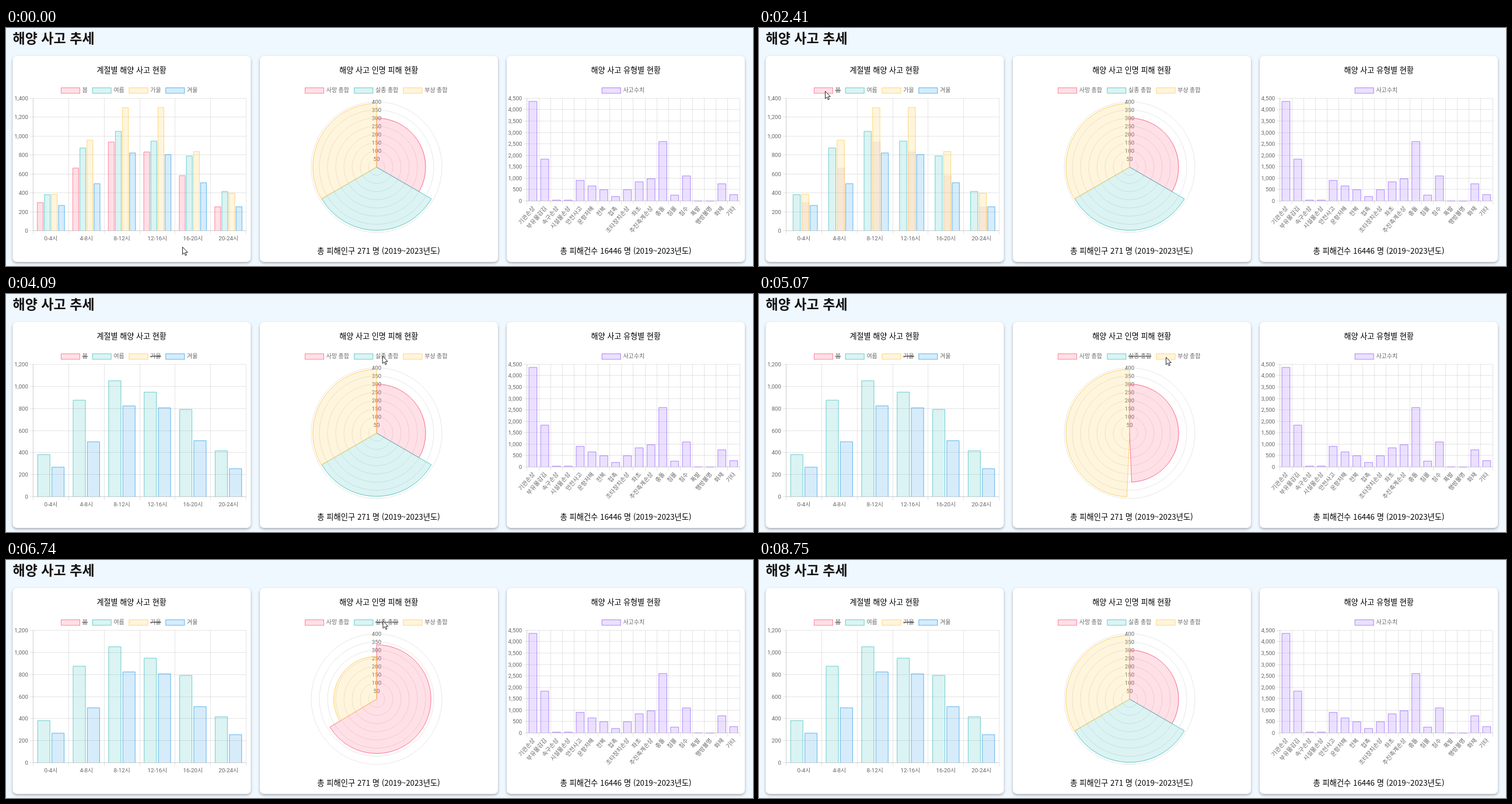
Recreate the animation shown at these times as an HTML page with a canvas. Size 1280x408 px, loop 9960 ms.

```html
<!DOCTYPE html>
<html lang="ko">
<head>
<meta charset="utf-8">
<title>해양 사고 추세</title>
<style>
  html, body { margin: 0; width: 100%; height: 100%; overflow: hidden; background: #f0f8ff; }
  svg, canvas { position: absolute; left: 0; top: 0; width: 1280px; height: 408px; }
  svg { font: 13.3px "Noto Sans CJK KR", "Noto Sans CJK", sans-serif; fill: #000; }
  .card { fill: #fff; filter: drop-shadow(0 2px 2px rgba(0, 0, 0, .32)); }
  .mid { text-anchor: middle; }
  .name { font-size: 13.1px; }
  .head { font-size: 23.05px; font-weight: 700; fill: #111; }
</style>
</head>
<body>
<svg viewBox="0 0 1280 408">
  <rect class="card" x="11.5" y="48" width="408" height="353" rx="7"/>
  <rect class="card" x="435" y="48" width="408" height="353" rx="7"/>
  <rect class="card" x="858" y="48" width="408" height="353" rx="7"/>
  <text class="head" x="11.5" y="26.3">해양 사고 추세</text>
  <g class="mid">
    <text class="name" x="215.2" y="76.6">계절별 해양 사고 현황</text>
    <text class="name" x="638.7" y="76.6">해양 사고 인명 피해 현황</text>
    <text class="name" x="1062.2" y="76.6">해양 사고 유형별 현황</text>
    <text x="638.5" y="386.8">총 피해인구 271 명 (2019~2023년도)</text>
    <text x="1062" y="386.8">총 피해건수 16446 명 (2019~2023년도)</text>
  </g>
</svg>
<canvas id="stage" width="1280" height="408"></canvas>
<script>
const ctx = document.getElementById('stage').getContext('2d');
const LOOP = 9960;
const PINK = [255, 99, 132], TEAL = [75, 192, 192], YELLOW = [255, 205, 86],
      BLUE = [54, 162, 235], PURPLE = [153, 102, 255];

const seasons = [
  { name: '봄', x: 94, color: PINK, hover: [255, 48, 89], data: [300, 665, 940, 835, 585, 255] },
  { name: '여름', x: 147.7, color: TEAL, hover: [2, 212, 212], data: [384, 877, 1053, 950, 793, 418] },
  { name: '가을', x: 210.5, color: YELLOW, hover: [255, 188, 35], data: [387, 960, 1303, 1305, 840, 400] },
  { name: '겨울', x: 273.3, color: BLUE, data: [270, 500, 825, 808, 510, 256] }
];
const hours = ['0-4시', '4-8시', '8-12시', '12-16시', '16-20시', '20-24시'];
const victims = [
  { name: '사망 총합', x: 512, color: PINK, value: 300 },
  { name: '실종 총합', x: 596.3, color: TEAL, value: 387 },
  { name: '부상 총합', x: 680.5, color: YELLOW, value: 390 }
];
const kinds = ['기관손상', '부유물감김', '속구손상', '시설물손상', '안전사고', '운항저해', '전복', '접촉',
  '조타장치손상', '좌초', '추진축계손상', '충돌', '침몰', '침수', '폭발', '행방불명', '화재', '기타'];
const counts = [4370, 1840, 45, 45, 910, 665, 500, 205, 500, 845, 980, 2610, 265, 1105, 8, 4, 760, 285];

// Each stage starts with a legend click; a hidden bar drifts to the last slot.
const barStages = [
  { at: -2000, slots: [0, 1, 2, 3], n: 4, max: 1400, shown: [1, 1, 1, 1] },
  { at: 2195, slots: [2, 0, 1, 2], n: 3, max: 1400, shown: [0, 1, 1, 1] },
  { at: 3115, slots: [1, 0, 1, 1], n: 2, max: 1200, shown: [0, 1, 0, 1] }
];
const pieStages = [
  { at: -2000, max: 400, shown: [1, 1, 1] },
  { at: 4517, max: 400, shown: [1, 0, 1] },
  { at: 5350, max: 300, shown: [1, 0, 0] },
  { at: 6497, max: 400, shown: [1, 0, 1] },
  { at: 7230, max: 400, shown: [1, 1, 1] }
];
// time, x, y
const pointer = [
  [0, 302, 375], [420, 228, 285], [640, 184, 236], [780, 183.5, 232], [1050, 183.5, 230],
  [1180, 192, 205], [1450, 150, 130], [1700, 116, 84], [1930, 113, 108], [2480, 113, 108],
  [2950, 225, 105], [3460, 225, 105], [4100, 645, 106], [4600, 641, 107], [5070, 697, 108],
  [5210, 702, 108], [6510, 700, 108], [6740, 645.5, 104], [7300, 645, 104], [8000, 1152, 118],
  [8210, 1090, 110], [8470, 1090, 110], [8540, 1080, 102], [8610, 1122, 118], [8680, 1222, 152]
];
// time, hovered season
const hovers = [[490, 2], [590, 0], [1120, 1]];
const HOVER_END = 1250;

const clamp = v => Math.min(1, Math.max(0, v));
const mix = (a, b, k) => a + (b - a) * k;
const easeOut = p => 1 - (1 - clamp(p)) ** 4;
const rgba = (c, a) => `rgba(${c.map(Math.round)},${a})`;
const last = (list, ok) => list.reduce((found, item, i) => ok(item) ? i : found, -1);

function stageAt(stages, t) {
  const i = last(stages, s => s.at <= t);
  return { to: stages[i], from: stages[Math.max(0, i - 1)], k: easeOut((t - stages[i].at) / 1000) };
}

function line(x1, y1, x2, y2, color = 'rgba(0,0,0,.1)', width = 1) {
  ctx.strokeStyle = color;
  ctx.lineWidth = width;
  ctx.beginPath();
  ctx.moveTo(x1, y1);
  ctx.lineTo(x2, y2);
  ctx.stroke();
}

function label(str, x, y, align = 'left', size = 10, color = '#666', weight = 400) {
  ctx.font = `${weight} ${size}px Roboto, "Noto Sans CJK KR", "Noto Sans CJK", sans-serif`;
  ctx.textAlign = align;
  ctx.fillStyle = color;
  ctx.fillText(str, x, y + 3.6);
  return ctx.measureText(str).width;
}

function legend(items, shown) {
  items.forEach((it, i) => {
    ctx.fillStyle = rgba(it.color, .2);
    ctx.fillRect(it.x, 102, 33, 10);
    ctx.strokeStyle = rgba(it.color, .75);
    ctx.lineWidth = 1;
    ctx.strokeRect(it.x + .5, 102.5, 32, 9.5);
    const w = label(it.name, it.x + 36.7, 106.3);
    if (!shown[i]) line(it.x + 36.7, 106.8, it.x + 36.7 + w, 106.8, '#666', 1.6);
  });
}

function axes(box, max, step, columns) {
  const { left, right, top, bottom } = box;
  for (let v = 0; v <= max; v += step) {
    const y = Math.round(mix(bottom, top, v / max) - .5) + .5;
    line(left - 6, y, right, y);
    label(v.toLocaleString('en-US'), left - 8.5, y - .2, 'right', 9.7);
  }
  for (let i = 0; i <= columns; i++) {
    const x = Math.round(mix(left, right, i / columns) - .5) + .5;
    line(x, top, x, bottom + 6.5);
  }
  line(left, top, left, bottom);
  line(left, bottom, right, bottom);
}

function bar(x, y, w, bottom, color, fade = 1) {
  const c = color.map(v => v * fade ** (1 / 2.2));
  ctx.fillStyle = rgba(c, .2 * fade);
  ctx.fillRect(x, y, w, bottom - y);
  // A vanishing bar loses its outline well before its fill.
  ctx.strokeStyle = rgba(c, .8 * fade ** 3);
  ctx.lineWidth = .9;
  ctx.beginPath();
  ctx.moveTo(x + .45, bottom);
  ctx.lineTo(x + .45, y + .45);
  ctx.lineTo(x + w - .45, y + .45);
  ctx.lineTo(x + w - .45, bottom);
  ctx.stroke();
}

function seasonChart(t) {
  const box = { left: 46.5, right: 411.5, top: 120.5, bottom: 347.5 };
  const { from, to, k } = stageAt(barStages, t);
  const cell = (box.right - box.left) / 6;
  const hover = t < HOVER_END ? last(hovers, h => h[0] <= t) : -1;
  legend(seasons, to.shown);
  axes(box, to.max, 200, 6);
  hours.forEach((h, i) => label(h, box.left + cell * (i + .5), 360.7, 'center', 9.8));

  const place = (s, set, cat) => {
    const slot = cell * .8 / s.n;
    return [box.left + cell * (cat + .1) + slot * (s.slots[set] + .05), slot * .9,
      mix(box.bottom, box.top, seasons[set].data[cat] / s.max)];
  };
  ctx.save();
  ctx.beginPath();
  ctx.rect(box.left, box.top - .5, box.right - box.left, box.bottom - box.top + 1);
  ctx.clip();
  for (let set = 3; set >= 0; set--) {
    const fade = mix(from.shown[set], to.shown[set], k);
    if (fade < .004) continue;
    hours.forEach((_, cat) => {
      const a = place(from, set, cat), b = place(to, set, cat);
      const [x, w, y] = a.map((v, i) => mix(v, b[i], k));
      const lit = cat === 2 && hover >= 0 && hovers[hover][1] === set;
      bar(x, y, w, box.bottom, lit ? seasons[set].hover : seasons[set].color, fade);
    });
  }
  ctx.restore();
}

function tooltip(t) {
  const i = last(hovers, h => h[0] <= t);
  const alpha = clamp((t - hovers[0][0]) / 200) * clamp(1 - (t - HOVER_END) / 200);
  if (i < 0 || alpha <= 0) return;
  const spot = n => {
    const set = hovers[n][1], value = seasons[set].data[2];
    return [186 + set * 12.2, 347.5 - value * 227 / 1400, set ? 72 : 52];
  };
  const a = spot(Math.max(0, i - 1)), b = spot(i), k = easeOut((t - hovers[i][0]) / 400);
  const [x, y, w] = a.map((v, j) => mix(v, b[j], k));
  const s = seasons[hovers[i][1]];
  ctx.save();
  ctx.globalAlpha = alpha;
  ctx.fillStyle = 'rgba(0,0,0,.74)';
  ctx.beginPath();
  ctx.roundRect(x, y - 18, w, 36, 5);
  ctx.moveTo(x, y - 4.5);
  ctx.lineTo(x - 4.5, y);
  ctx.lineTo(x, y + 4.5);
  ctx.fill();
  label('8-12시', x + 5, y - 8.7, 'left', 9.8, '#fff', 700);
  ctx.fillStyle = '#fff';
  ctx.fillRect(x + 5, y + 3, 10, 10);
  ctx.fillStyle = rgba(s.hover, .25);
  ctx.fillRect(x + 6, y + 4, 8, 8);
  label(`${s.name}: ${s.data[2].toLocaleString('en-US')}`, x + 16.5, y + 7.8, 'left', 9.8, '#fff', 700);
  ctx.restore();
}

function victimChart(t) {
  const cx = 635, cy = 238.5, R = 112;
  const { from, to, k } = stageAt(pieStages, t);
  legend(victims, to.shown);
  const rings = to.max / 50;
  ctx.strokeStyle = 'rgba(0,0,0,.1)';
  ctx.lineWidth = 1;
  for (let i = 1; i <= rings; i++) {
    ctx.beginPath();
    ctx.arc(cx, cy, R * i / rings, 0, 7);
    ctx.stroke();
  }
  for (let i = 1; i <= rings; i++) {
    const y = cy - R * i / rings;
    ctx.fillStyle = 'rgba(255,255,255,.75)';
    ctx.fillRect(cx - 10, y - 6.5, 20, 13);
    label(i * 50, cx, y, 'center', 9.7);
  }
  const arcs = s => {
    const sweep = 2 * Math.PI / s.shown.reduce((a, b) => a + b);
    let angle = -Math.PI / 2;
    return victims.map((v, i) => {
      const start = angle;
      angle += s.shown[i] * sweep;
      return [s.shown[i] * R * v.value / s.max, start, angle];
    });
  };
  const before = arcs(from), after = arcs(to);
  victims.forEach((v, i) => {
    const [r, start, end] = before[i].map((n, j) => mix(n, after[i][j], k));
    if (r < .3) return;
    ctx.beginPath();
    if (end - start < 2 * Math.PI - .001) ctx.moveTo(cx, cy);
    ctx.arc(cx, cy, r, start, end);
    ctx.closePath();
    ctx.fillStyle = rgba(v.color, .2);
    ctx.fill();
    ctx.strokeStyle = rgba(v.color, .9);
    ctx.lineWidth = 1;
    ctx.stroke();
  });
}

function kindChart() {
  const box = { left: 892.8, right: 1257, top: 120.3, bottom: 296.4 };
  const cell = (box.right - box.left) / kinds.length;
  legend([{ name: '사고수치', x: 1020.7, color: PURPLE }], [1]);
  axes(box, 4500, 500, kinds.length);
  kinds.forEach((name, i) => {
    const x = box.left + cell * i;
    bar(x + cell * .14, mix(box.bottom, box.top, counts[i] / 4500), cell * .72, box.bottom, PURPLE);
    ctx.save();
    ctx.translate(x + cell / 2 + 1, 307);
    ctx.rotate(-50 * Math.PI / 180);
    label(name, 0, 0, 'right', 10.1);
    ctx.restore();
  });
}

function cursor(t) {
  if (t >= 8750) return;
  const i = last(pointer, p => p[0] <= t);
  const a = pointer[i], b = pointer[i + 1] || a;
  const p = b === a ? 0 : (t - a[0]) / (b[0] - a[0]);
  const k = p * p * (3 - 2 * p);
  ctx.save();
  ctx.translate(mix(a[1], b[1], k), mix(a[2], b[2], k));
  ctx.fillStyle = '#fff';
  ctx.strokeStyle = '#222';
  ctx.lineWidth = 1;
  ctx.lineJoin = 'round';
  ctx.fill(cursorShape);
  ctx.stroke(cursorShape);
  ctx.restore();
}
const cursorShape = new Path2D('M.5 .5V13.2L3.4 10.4 5.4 15 7.4 14.1 5.4 9.7H9.4Z');

// The picture advances in 70 ms ticks, restarting at these moments.
const ticks = [0, 780, 1100, 2130, 6740, 8540];
function snap(t) {
  const base = ticks[last(ticks, s => s <= t)];
  return base + Math.floor((t - base) / 70) * 70;
}

function draw(t) {
  ctx.clearRect(0, 0, 1280, 408);
  seasonChart(t);
  victimChart(t);
  kindChart();
  tooltip(t);
  cursor(t);
}

const began = performance.now();
function frame() {
  draw(snap((performance.now() - began) % LOOP));
  requestAnimationFrame(frame);
}
frame();
</script>
</body>
</html>
```
